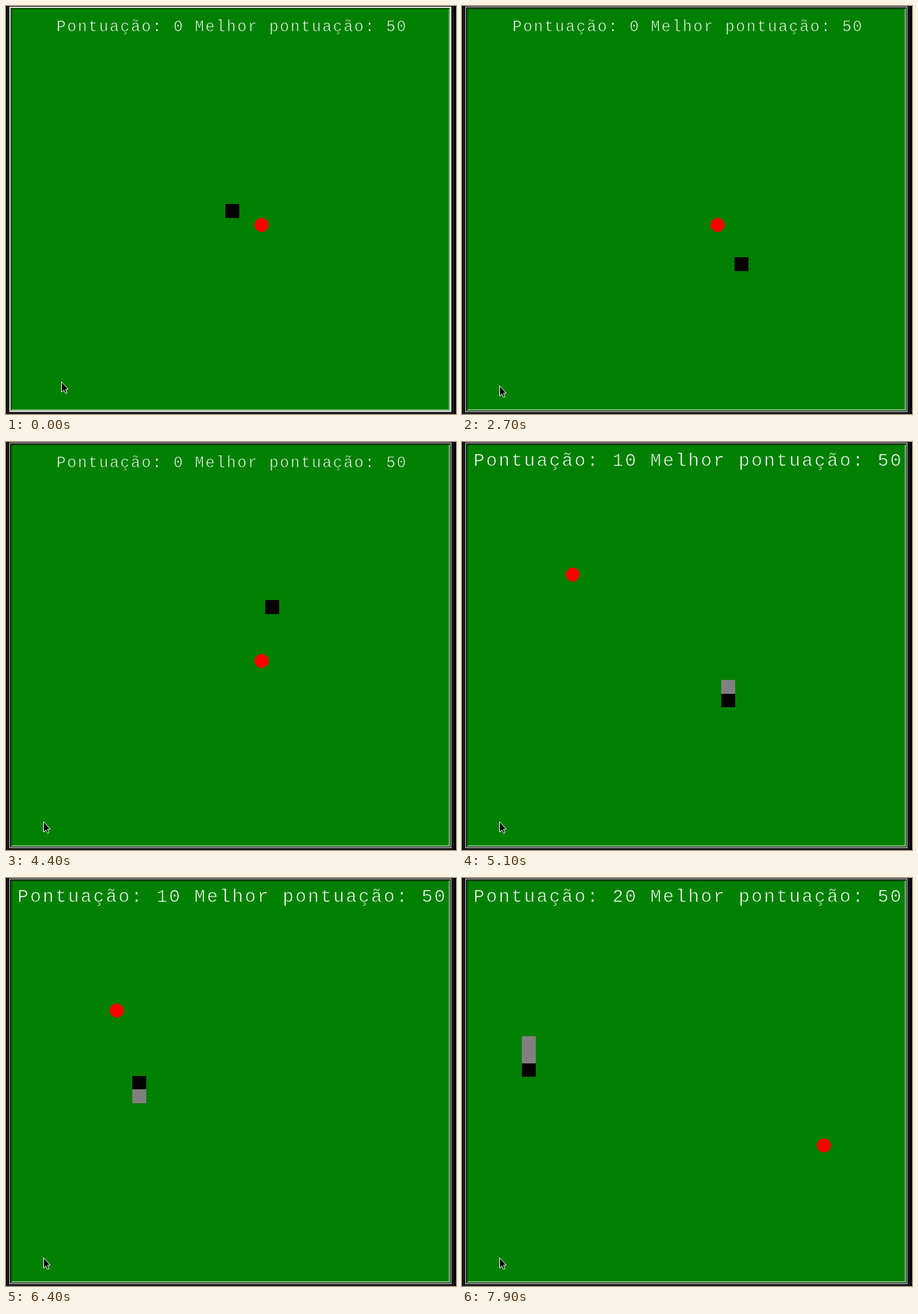
Recreate the animation shown at these times as an HTML page with a canvas. Size 677 by 614 pixels, loop 8 s.

```html
<!DOCTYPE html>
<html lang="pt">
<head>
<meta charset="utf-8">
<title>Jogo da cobrinha</title>
<style>
  html, body { margin: 0; width: 100%; height: 100%; overflow: hidden; background: #000; }
  canvas { display: block; }
</style>
</head>
<body>
<canvas id="stage" width="677" height="614"></canvas>
<script>
const ctx = document.getElementById('stage').getContext('2d');
const TICK = 100, LOOP = 8000, CELL = 20, START = 20;
const GREEN = '#008000';

// Route of the head: direction and number of cells.
const ROUTE = 'R4 D5 L4 U8 R3 D7 L10 U9 L5 D4';
const STEP = { R: [1, 0], L: [-1, 0], U: [0, -1], D: [0, 1] };
const cells = [[330, 298]];
for (const run of ROUTE.split(' ')) {
  const [dx, dy] = STEP[run[0]];
  for (let i = 0; i < +run.slice(1); i++) {
    const [x, y] = cells[cells.length - 1];
    cells.push([x + dx * CELL, y + dy * CELL]);
  }
}

// The game advances one cell per tick, apart from stalls and catch-ups.
const STALLS = [25, 28, 61, 63, 67, 71, 76];
const DOUBLES = [26, 57, 62, 64, 68, 77];
const MEALS = [49, 72];
const FOOD = [[384.5, 329.5], [166.5, 199.5], [544.5, 402.5]];

const countUntil = (list, tick) => list.filter(t => t <= tick).length;

function headIndex(tick) {
  return Math.max(0, tick - START + 1) - countUntil(STALLS, tick) + countUntil(DOUBLES, tick);
}

function rect(color, x, y, w, h) {
  ctx.fillStyle = color;
  ctx.fillRect(x, y, w, h);
}

function polygon(points, fill, stroke) {
  ctx.beginPath();
  for (const [x, y] of points) ctx.lineTo(x, y);
  ctx.closePath();
  ctx.fillStyle = fill;
  ctx.fill();
  ctx.strokeStyle = stroke;
  ctx.lineWidth = 1;
  ctx.lineJoin = 'round';
  ctx.stroke();
}

function drawBoard(focused) {
  rect('#000', 0, 0, 677, 614);
  rect('#16181c', 1, 0, 673, 614);
  rect('#d9d9d9', 5, 1, 665, 610);
  rect(focused ? '#000' : '#d9d9d9', 6, 2, 663, 608);
  rect('#7fbf7f', 7, 3, 661, 606);
  polygon([[7, 3], [668, 3], [666, 5], [9, 607], [7, 609]], '#004d00', 'transparent');
  rect(GREEN, 9, 5, 657, 602);
}

function drawScore(score) {
  const text = `Pontuação: ${score} Melhor pontuação: 50`;
  const [pitch, baseline] = score ? [19, 36] : [16, 38];
  const size = pitch * 1.45, spacing = pitch - size * 0.6;
  const left = 339 - text.length * pitch / 2 + spacing / 2;
  ctx.font = `${size}px "Liberation Mono", monospace`;
  ctx.letterSpacing = `${spacing}px`;
  ctx.fillStyle = '#fff';
  ctx.fillText(text, left, baseline);
  // A thin outline in the board colour makes the strokes lighter.
  ctx.strokeStyle = GREEN;
  ctx.lineWidth = 0.7;
  ctx.strokeText(text, left, baseline);
}

function drawFood([cx, cy]) {
  const points = Array.from({ length: 20 }, (_, i) => {
    const a = i * Math.PI / 10;
    return [cx + 10.3 * Math.cos(a), cy + 10 * Math.sin(a)];
  });
  polygon(points, '#f00', '#f00');
}

function drawPointer(tick) {
  const k = Math.min(tick, 3) / 3;
  const x = 83.5 - 27 * k, y = 565.5 + 6 * k;
  const arrow = [[0, 0], [0, 15.5], [3.5, 12.5], [6, 17.5], [8.3, 16.5], [6, 11.5], [10, 11]];
  polygon(arrow.map(([px, py]) => [x + px, y + py]), '#000', '#fff');
}

function draw(time) {
  const tick = Math.floor(time % LOOP / TICK);
  const head = headIndex(tick);
  const eaten = countUntil(MEALS, tick);
  drawBoard(tick >= 7);
  drawScore(eaten * 10);
  rect('#000', ...cells[head], 21, 21);
  drawFood(FOOD[eaten]);
  for (let i = 1; i <= eaten; i++) rect('#808080', ...cells[head - i], 21, 21);
  drawPointer(tick);
}

const startTime = performance.now();
function frame() {
  draw(performance.now() - startTime);
  requestAnimationFrame(frame);
}
frame();
</script>
</body>
</html>
```
